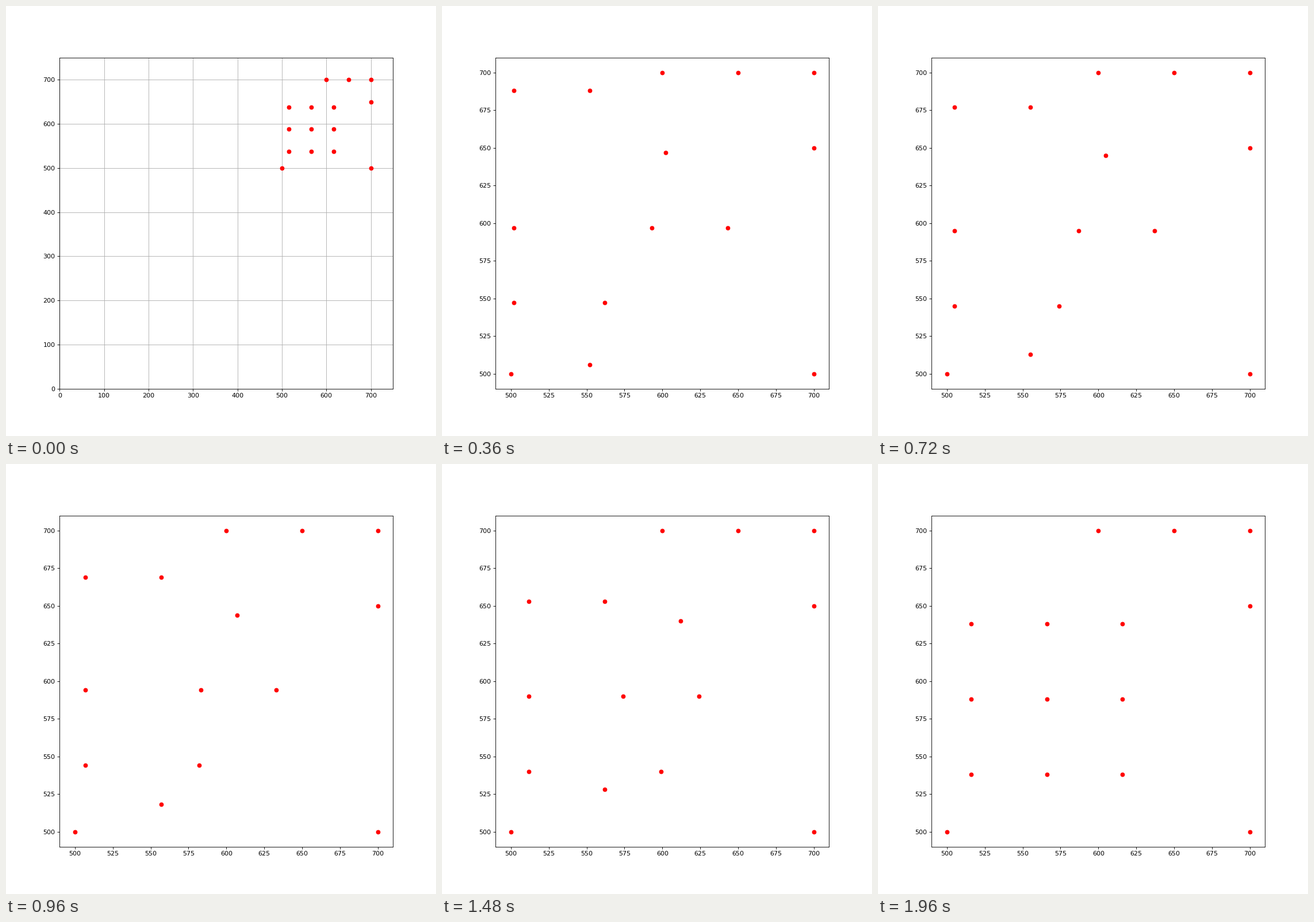
Animation, 748 px wide and 748 px high, one loop 4 s. Source, as a matplotlib script:

```python
import numpy as np
import matplotlib.pyplot as plt
from matplotlib.animation import FuncAnimation

STEPS = 49      # moves from the start layout to the finished grid
FRAMES = 100    # the grid is held for the rest of the loop
CELL = 50

# the still dots: bottom corners, right edge and a row along the top
still = np.array([(500, 500), (700, 500), (700, 650)]
                 + [(x, 700) for x in range(600, 701, CELL)])

# a 3 x 3 lattice, indexed row by row from the bottom as (x, y)
lattice = np.stack(np.meshgrid(range(3), range(3)), axis=-1)

# some dots begin one cell away from their place
shift = np.zeros_like(lattice)
shift[0, 1] = 0, -1
shift[0, 2] = -1, 0
shift[1, 1:] = 1, 0
shift[2, :2] = 0, 1

start = (500, 550) + CELL * (lattice + shift)
goal = (516, 538) + CELL * lattice

fig, ax = plt.subplots(figsize=(9.35, 9.35), dpi=80)
fig.subplots_adjust(left=0.1249)
dots, = ax.plot([], [], "ro")


def set_view(low, high, ticks, grid):
    ax.set(xlim=(low, high), ylim=(low, high), xticks=ticks, yticks=ticks)
    ax.grid(grid)


def draw(frame):
    if frame == 0:
        set_view(0, 750, range(0, 701, 100), True)
        moving = goal
    else:
        set_view(490, 710, range(500, 701, 25), False)
        k = min(frame, STEPS)
        # positions snap down to whole units
        moving = (start * (STEPS - k) + goal * k) // STEPS
    dots.set_data(*np.vstack([still, moving.reshape(-1, 2)]).T)
    return dots,


anim = FuncAnimation(fig, draw, frames=FRAMES, interval=40,
                     init_func=lambda: draw(0), repeat=True, repeat_delay=0)
plt.show()
```
